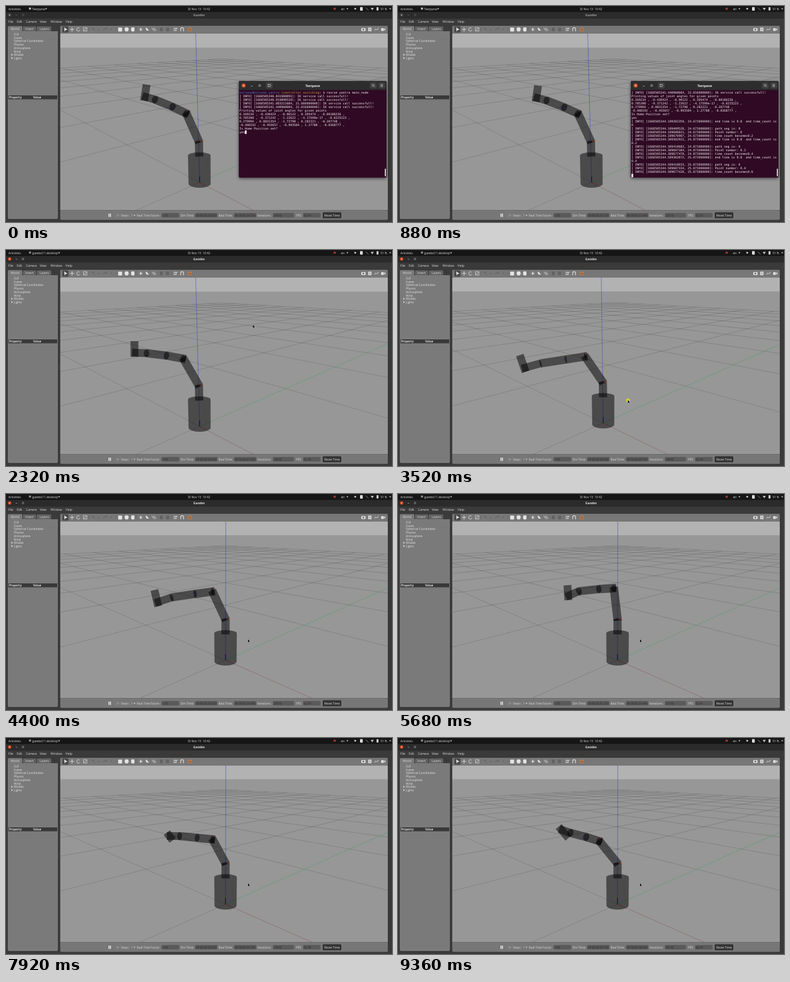
Write an HTML page with a canvas that moves like this. It is 640 by 360 pixels and loops after 9.44 s.

```html
<!DOCTYPE html>
<html lang="en">
<head>
<meta charset="utf-8">
<title>Robot arm simulation</title>
<style>
html, body { margin: 0; width: 100%; height: 100%; overflow: hidden; background: #333; }
canvas { display: block; width: 640px; height: 360px; }
</style>
</head>
<body>
<canvas id="stage"></canvas>
<script>
const canvas = document.getElementById('stage');
const ctx = canvas.getContext('2d');
const ratio = window.devicePixelRatio || 1;
canvas.width = 640 * ratio;
canvas.height = 360 * ratio;

const LOOP = 9440, STEP = 80;
const UI = '"Open Sans", "Noto Sans", sans-serif';
const MONO = '"DejaVu Sans Mono", monospace';
const SHELL_NAME = 'Textpane';
const SHELL_CLOSE = 2000;

// ---- drawing helpers ----
function rect(x, y, w, h, color) {
  ctx.fillStyle = color;
  ctx.fillRect(x, y, w, h);
}
function round(x, y, w, h, r, color) {
  ctx.fillStyle = color;
  ctx.beginPath();
  ctx.roundRect(x, y, w, h, r);
  ctx.fill();
}
function dot(x, y, r, color) {
  ctx.fillStyle = color;
  ctx.beginPath();
  ctx.arc(x, y, r, 0, 7);
  ctx.fill();
}
function poly(points, color) {
  ctx.fillStyle = color;
  ctx.beginPath();
  points.forEach(([x, y]) => ctx.lineTo(x, y));
  ctx.closePath();
  ctx.fill();
}
function stroke(points, color, width = 1) {
  ctx.strokeStyle = color;
  ctx.lineWidth = width;
  ctx.beginPath();
  points.forEach(([x, y]) => ctx.lineTo(x, y));
  ctx.stroke();
}
function text(s, x, y, { size = 5, color = '#ddd', font = UI, weight = '', align = 'left' } = {}) {
  ctx.font = `${weight} ${size}px ${font}`;
  ctx.fillStyle = color;
  ctx.textAlign = align;
  ctx.textBaseline = 'alphabetic';
  ctx.fillText(s, x, y);
}
function caret(x, y, color = '#ccc') {
  poly([[x - 1.7, y - 0.9], [x + 1.7, y - 0.9], [x, y + 1.2]], color);
}

// ---- motion ----
const mix = (a, b, u) => a + (b - a) * u;

// Smooth curve through [time, values] keys, at rest at both ends.
function curve(keys, t) {
  const last = keys.length - 1;
  if (t <= keys[0][0]) return keys[0][1];
  if (t >= keys[last][0]) return keys[last][1];
  const i = keys.findIndex(k => k[0] > t) - 1;
  const slope = (n, c) => n === 0 || n === last ? 0
    : (keys[n + 1][1][c] - keys[n - 1][1][c]) / (keys[n + 1][0] - keys[n - 1][0]);
  const [t0, a] = keys[i], [t1, b] = keys[i + 1];
  const d = t1 - t0, u = (t - t0) / d, u2 = u * u, u3 = u2 * u;
  return a.map((v, c) => (2 * u3 - 3 * u2 + 1) * v + (u3 - 2 * u2 + u) * d * slope(i, c)
    + (3 * u2 - 2 * u3) * b[c] + (u3 - u2) * d * slope(i + 1, c));
}

// elbow, joint, joint, wrist, hand tip (x, y from the base) and joint disc width
const ARM = [
  [515, [-22, -115, -45, -126, -74, -138, -91, -143, -88, -162, 5]],
  [1840, [-26, -113, -50, -120, -81, -127, -99, -130, -97, -148, 4.5]],
  [2320, [-27, -113, -55, -118, -88, -122, -108, -123, -108, -141, 4.5]],
  [3520, [-30, -111, -62, -106, -104, -99.5, -131, -92, -138, -112.5, 1.6]],
  [5680, [-6, -120, -31, -118.5, -64, -115, -82, -107, -83, -124, 4.5]],
  [7040, [6.5, -118.5, -30, -108, -69, -97.5, -92, -82, -106, -98, 1.2]],
  [8360, [-30, -105, -52, -112, -78, -119, -93, -124, -82, -111, 5]]
];
const BASE = [[3080, [321, 294]], [3520, [340.3, 288.5]], [4160, [364, 277]]];
const POINTER = [
  [1120, [520, 214]], [1680, [408, 135]], [2480, [408, 135]], [3080, [363, 256]],
  [3520, [381, 250]], [4160, [401, 242]]
];

// ---- 3D view: fixed orientation, panned camera ----
const CX = 361.5, CY = 193, FOCAL = 470, DEPTH = 1.85, PITCH = 0.2756;
const SIN = Math.sin(PITCH), COS = Math.cos(PITCH), R2 = Math.SQRT1_2;

function toCamera(x, y, z, base) {
  const side = (x + y) * R2, ahead = (y - x) * R2;
  return [
    (base[0] - CX) / FOCAL * DEPTH + side,
    (base[1] - CY) / FOCAL * DEPTH - ahead * SIN - z * COS,
    DEPTH + ahead * COS - z * SIN
  ];
}
const project = p => [CX + FOCAL * p[0] / p[2], CY + FOCAL * p[1] / p[2]];

function line3(a, b, base, color, width) {
  const near = 0.1;
  let p = toCamera(...a, base), q = toCamera(...b, base);
  if (p[2] < near && q[2] < near) return;
  if (p[2] > q[2]) [p, q] = [q, p];
  if (p[2] < near) {
    const u = (near - p[2]) / (q[2] - p[2]);
    p = p.map((v, i) => mix(v, q[i], u));
  }
  stroke([project(p), project(q)], color, width);
}

function drawGround(base) {
  const edge = project(toCamera(-33, 33, 0, base))[1];
  const grid = 'rgba(45,45,45,.4)';
  rect(90, 46, 543, 30, '#b2b2b2');
  rect(90, edge, 543, 341 - edge, '#979797');
  for (let i = -10; i <= 10; i++) {
    line3([i, -10, 0], [i, 10, 0], base, grid, 0.5);
    line3([-10, i, 0], [10, i, 0], base, grid, 0.5);
  }
  line3([0, 0, 0], [10, 0, 0], base, 'rgba(180,85,85,.5)', 0.6);
  line3([0, 0, 0], [0, 10, 0], base, 'rgba(95,195,115,.6)', 0.7);
  line3([0, 0, 0], [0, 0, 5], base, 'rgba(55,55,205,.65)', 0.8);
}

// ---- robot ----
const SHADE = 'rgba(0,0,0,.51)';

function link(a, b, width, before = 0, after = 0) {
  const len = Math.hypot(b[0] - a[0], b[1] - a[1]) || 1;
  const ux = (b[0] - a[0]) / len, uy = (b[1] - a[1]) / len;
  const nx = -uy * width / 2, ny = ux * width / 2;
  const p = [a[0] - ux * before, a[1] - uy * before];
  const q = [b[0] + ux * after, b[1] + uy * after];
  poly([[p[0] + nx, p[1] + ny], [q[0] + nx, q[1] + ny],
    [q[0] - nx, q[1] - ny], [p[0] - nx, p[1] - ny]], SHADE);
}
function disc(p, rx, ry, angle) {
  ctx.fillStyle = SHADE;
  ctx.beginPath();
  ctx.ellipse(p[0], p[1], rx, ry, angle, 0, 7);
  ctx.fill();
}

function drawRobot(t, base) {
  const pose = curve(ARM, t), [bx, by] = base;
  const [elbow, j1, j2, wrist, tip] = [0, 2, 4, 6, 8].map(i => [bx + pose[i], by + pose[i + 1]]);
  const lean = (bx - 364) * 0.026;
  const shoulder = [bx + lean, by - 68];
  const thick = pose[10];

  ctx.fillStyle = SHADE;
  ctx.beginPath();
  ctx.ellipse(bx + lean / 2, by - 45, 18.7, 5, 0, Math.PI, 0);
  ctx.lineTo(bx + 18.3, by + 2);
  ctx.ellipse(bx, by + 2, 18.3, 7, 0, 0, Math.PI);
  ctx.closePath();
  ctx.fill();
  link(shoulder, [bx + lean / 2, by - 43], 13.5);
  disc(shoulder, 6.5, 1.8, -0.1);
  link(shoulder, elbow, 14, 2, 2);

  const reach = Math.atan2(j1[1] - elbow[1], j1[0] - elbow[0]);
  link(elbow, j1, 13.8, 4);
  link(j1, j2, 13.5);
  link(j2, wrist, 13, 0, 4);
  disc(elbow, thick, 6, reach);
  disc(j1, thick, 6.5, reach);
  disc(j2, thick, 6.4, Math.atan2(wrist[1] - j2[1], wrist[0] - j2[0]));
  link(wrist, tip, 13, 7, 1);

  stroke([[bx, by - 10], [bx, by]], '#101050', 1.2);
  stroke([[bx, by], [bx + 7, by + 4]], '#7a2020', 0.8);
  stroke([[bx, by], [bx + 5, by - 2]], '#1d5c2a', 0.7);
  stroke([[shoulder[0] + 2, shoulder[1]], [shoulder[0] + 7, shoulder[1] - 1]], '#b4451c', 0.9);
  stroke([shoulder, [shoulder[0] - 3, shoulder[1] - 3]], '#1c2070', 0.8);
  stroke([[elbow[0], elbow[1] - 6], [elbow[0] + 3, elbow[1] - 4]], '#9c3030', 0.8);
  stroke([[j1[0], j1[1] - 6], [j1[0] + 2, j1[1] - 6.5]], '#8c3030', 0.7);
  stroke([[j1[0] - 4, j1[1]], [j1[0], j1[1] + 1]], '#22267c', 0.7);
}

// ---- window chrome ----
function drawTopBar(t) {
  const shell = t < SHELL_CLOSE;
  rect(0, 0, 640, 10, '#161616');
  text('Activities', 4, 6.5);
  round(38, 2.5, 3.5, 3.5, 0.8, shell ? '#b5b5b5' : '#888');
  text(shell ? SHELL_NAME : 'gazebo11.desktop', 43.5, 6.5);
  caret(shell ? 66.5 : 88, 4.7);
  text('Di Nov 15  10:42', 320, 6.5, { align: 'center', size: 4.9 });
  dot(545, 4.5, 2.1, '#a8302c');
  text('en', 555.5, 6.5);
  caret(566, 4.7);
  dot(579, 4.5, 1.6, '#ccc');
  round(587, 1.7, 4.5, 6, 1, '#ddd');
  stroke([[596.5, 3], [601, 7]], '#aaa', 0.8);
  poly([[604.5, 3.2], [610, 3.2], [607.2, 7]], '#ccc');
  round(614.5, 2, 3, 5.5, 0.5, '#ddd');
  text('91 %', 621, 6.5, { size: 4.8 });
  caret(637, 4.7);
}

function drawWindow(t) {
  const shell = t < SHELL_CLOSE;
  rect(0, 10, 640, 350, '#3a3a3a');
  rect(0, 10, 640, 11, '#2b2b2b');
  dot(6, 15, 2.7, shell ? '#454545' : '#df4a22');
  stroke([[5, 14], [7, 16]], '#ddd', 0.5);
  stroke([[7, 14], [5, 16]], '#ddd', 0.5);
  stroke([[16, 15.5], [18.5, 15.5]], shell ? '#777' : '#ccc', 0.6);
  ctx.strokeStyle = shell ? '#777' : '#ccc';
  ctx.lineWidth = 0.5;
  ctx.strokeRect(27, 13.8, 2.4, 2.4);
  text('Gazebo', 320, 17, { size: 5.2, weight: 'bold', align: 'center', color: shell ? '#999' : '#ddd' });
  [['File', 4], ['Edit', 18], ['Camera', 33], ['View', 56], ['Window', 74], ['Help', 99]]
    .forEach(([s, x]) => text(s, x, 27.6));
}

function drawSidebar() {
  round(3, 33.5, 24, 9, 1.5, '#7a7a7a');
  round(28, 34, 22, 8, 1.5, '#626262');
  round(51, 34, 24, 8, 1.5, '#626262');
  text('World', 8, 39.8);
  text('Insert', 32, 39.8);
  text('Layers', 56, 39.8);
  round(3, 42, 83, 313, [0, 0, 2, 2], '#7a7a7a');
  ['GUI', 'Scene', 'Spherical Coordinates', 'Physics', 'Atmosphere', 'Wind', 'Models', 'Lights']
    .forEach((s, i) => text(s, 13, 49 + i * 5.7, { size: 4.8, color: '#e2e2e2' }));
  [81.2, 86.8].forEach(y => poly([[9, y - 1.8], [11, y], [9, y + 1.8]], '#f4f4f4'));
  rect(4, 149, 81, 6.5, '#393939');
  text('Property', 5, 154.2, { weight: 'bold', size: 4.8 });
  text('Value', 45, 154.2, { weight: 'bold', size: 4.8 });
  [192, 195, 198].forEach(y => dot(88.3, y, 0.5, '#777'));
}

function drawToolbar() {
  const ink = '#dedede', dim = '#636363', y = 39;
  const divider = x => stroke([[x, 35], [x, 43]], '#666', 0.6);
  round(90, 33, 543, 13, 1.5, '#777');
  round(93.5, 33.8, 10, 10.5, 1, '#484848');
  poly([[96.5, 35.5], [102, 39.5], [99.2, 40], [97, 42.5]], ink);
  stroke([[106, y], [113, y]], ink, 0.9);
  stroke([[109.5, 35.5], [109.5, 42.5]], ink, 0.9);
  ctx.strokeStyle = ink;
  ctx.beginPath();
  ctx.arc(120, y, 2.8, 0.4, 5.6);
  ctx.stroke();
  ctx.lineWidth = 0.7;
  ctx.strokeRect(128.3, 36, 5.8, 5.8);
  stroke([[129, 41.5], [133.8, 36.5]], ink, 0.8);
  [136.8, 182, 217, 251, 275].forEach(divider);
  stroke([[147, 41], [146, 38], [142, 38], [144, 36]], dim, 1);
  caret(153, y, dim);
  stroke([[162, 41], [163, 38], [168, 38], [166, 36]], dim, 1);
  caret(174.5, y, dim);
  round(186, 36, 6.5, 6.5, 1, '#e3e3e3');
  dot(200, y, 3.4, '#e3e3e3');
  round(207.5, 35.6, 5.5, 7, 2, '#e3e3e3');
  dot(223.5, y, 1.7, ink);
  for (let a = 0; a < 8; a++) {
    const c = Math.cos(a * Math.PI / 4), s = Math.sin(a * Math.PI / 4);
    stroke([[223.5 + 2.2 * c, y + 2.2 * s], [223.5 + 3.3 * c, y + 3.3 * s]], ink, 0.6);
  }
  poly([[231, 36], [234, 37], [237, 41], [233, 41]], ink);
  [0, 2, 4].forEach(d => stroke([[242 + d, 36.5], [245 + d, 41.5]], ink, 0.7));
  round(255, 36, 5, 6, 0.5, dim);
  round(265.5, 36, 5, 6, 0.5, dim);
  stroke([[278.7, 36], [278.7, 42]], ink, 0.8);
  rect(280, 36.7, 4, 1.5, ink);
  rect(280, 39.8, 3, 1.5, ink);
  ctx.strokeStyle = ink;
  ctx.lineWidth = 1.2;
  ctx.beginPath();
  ctx.arc(292, 38.6, 2.4, Math.PI, 0);
  ctx.stroke();
  stroke([[289.6, 38.5], [289.6, 42]], ink, 1.2);
  stroke([[294.4, 38.5], [294.4, 42]], ink, 1.2);
  round(301.8, 36.3, 5.6, 5.8, 1, '#c67a45');
  rect(303.5, 38.3, 2.5, 2, '#80482a');
  round(589, 36.7, 7.2, 5, 1, ink);
  dot(592.5, 39.2, 1.4, '#666');
  round(600.5, 36, 5.5, 6, 0.7, ink);
  stroke([[602, 38], [605, 38]], '#555', 0.6);
  stroke([[602, 40], [605, 40]], '#555', 0.6);
  stroke([[611, 41], [613.2, 38], [615.2, 40], [618, 36.5]], ink, 0.9);
  round(622, 37, 4.5, 4.5, 0.6, ink);
  poly([[626.5, 39], [629, 37], [629, 41.3]], ink);
}

function drawStatus(t) {
  const sim = 24.03 + t * 0.00125;
  const clock = s => '00 00:00:' + s.toFixed(3);
  const label = { size: 4.8, color: '#d8d8d8' };
  round(90, 341, 543, 15.5, [0, 0, 2, 2], '#777');
  rect(170, 346, 1.4, 5.5, '#f2f2f2');
  rect(172.6, 346, 1.4, 5.5, '#f2f2f2');
  stroke([[183, 346.5], [183, 351.5]], '#999', 0.8);
  poly([[185, 346.5], [188, 349], [185, 351.5]], '#999');
  text('Steps:', 190.5, 350.5, label);
  text('1', 207.5, 350.5, label);
  caret(213, 349, '#ccc');
  [
    ['Real Time Factor:', 217, 258, 29, '1.00'],
    ['Sim Time:', 289.5, 313.5, 37, clock(sim)],
    ['Real Time:', 352.5, 378, 37, clock(sim + 0.364)],
    ['Iterations:', 417, 442.5, 35, String(Math.round(sim * 1000))],
    ['FPS:', 481, 492.5, 29, (62.4 + 0.3 * Math.sin(t / 900)).toFixed(2)]
  ].forEach(([name, x, fx, w, value]) => {
    text(name, x, 350.5, label);
    round(fx, 345, w, 7.5, 1, '#5a5a5a');
    text(value, fx + 1.5, 350.5, { size: 4.6, color: '#2a2a2a' });
  });
  round(525, 343.7, 31, 10, 1.5, '#333');
  text('Reset Time', 540.5, 350.6, { align: 'center' });
}

// ---- shell window ----
const INTRO = [
  '',
  '[ INFO] [1668505340.841900891]: IK service call successfull!',
  '[ INFO] [1668505340.919890510]: IK service call successfull!',
  '[ INFO] [1668505341.083211084, 21.660000000]: IK service call successfull!',
  '[ INFO] [1668505341.440960004, 22.016000000]: IK service call successfull!',
  'Printing values of joint angles for given points',
  '0.169234 , -0.430424 , -0.90122 , 0.305474 , -0.00180236 ,',
  '0.785398 , -0.371242 , -1.22622 , -4.17599e-17 , -0.0225223 ,',
  '0.279994 , 0.0831354 , -1.72798 , 0.282221 , -0.207748 ,',
  '-0.408192 , -0.455657 , -0.993584 , 1.27788 , -0.0368777 ,',
  'Is Home Position set?',
  'yes'
];

function logGroup(k) {
  const value = n => String(+(n * 0.2).toFixed(1));
  const simStamp = (24.673 + k * 0.2).toFixed(3) + '000000';
  const jitter = k * 7919 % 613;
  const head = us => `[ INFO] [${(1668505344 + 0.109 + k * 0.2).toFixed(3)}${302359 + us + jitter}, ${simStamp}]: `;
  return [
    head(0) + 'end time is 9.8  and time_count is',
    value(k),
    head(107161) + 'path_seg is: 0',
    head(304462) + 'Point number: ' + value(k),
    head(374548) + 'time_count becomes' + value(k + 1)
  ];
}

function drawShell(t) {
  const x = 386, y = 125;
  ctx.save();
  ctx.shadowColor = 'rgba(0,0,0,.6)';
  ctx.shadowBlur = 5 * ratio;
  ctx.shadowOffsetY = 1.5 * ratio;
  round(x, y, 245, 161, 2, '#300a24');
  ctx.restore();
  round(x, y, 245, 15, [2.5, 2.5, 0, 0], '#2d2d2d');
  dot(394, 132.5, 3.2, '#e2532b');
  stroke([[392.9, 131.4], [395.1, 133.6]], '#fff', 0.6);
  stroke([[395.1, 131.4], [392.9, 133.6]], '#fff', 0.6);
  if (t >= 1640) dot(407.5, 132.5, 3.2, '#484848');
  stroke([[406, 133.5], [409, 133.5]], '#ccc', 0.7);
  ctx.strokeStyle = '#ccc';
  ctx.lineWidth = 0.6;
  ctx.strokeRect(419.2, 131.2, 2.8, 2.8);
  round(431, 127.5, 11, 10, 1.5, '#414141');
  ctx.strokeRect(434.5, 130.5, 4, 4);
  stroke([[436.5, 131.5], [436.5, 133.7]], '#ddd', 0.6);
  text(SHELL_NAME, 508.5, 134.5, { size: 5.3, weight: 'bold', align: 'center', color: '#eee' });
  round(603.5, 127.5, 11, 10, 1.5, '#414141');
  ctx.beginPath();
  ctx.arc(608.6, 132, 1.6, 0, 7);
  ctx.stroke();
  stroke([[609.7, 133.2], [611, 134.6]], '#ddd', 0.7);
  round(617.5, 127.5, 11, 10, 1.5, '#414141');
  [130.8, 132.5, 134.2].forEach(v => stroke([[621, v], [625, v]], '#ddd', 0.6));

  const lines = INTRO.slice();
  for (let k = 0; 24.673 + k * 0.2 <= 24.03 + t * 0.00125; k++) lines.push(...logGroup(k));
  const first = Math.max(0, lines.length - 23);
  const mono = { font: MONO, color: '#f0ecef' };
  lines.slice(first).forEach((s, i) => {
    const row = 145.8 + i * 6.02;
    if (first + i > 0) return text(s, 387, row, mono);
    let px = 387;
    [['kolvane@kolvane', '#4a76c4'], [' yantra', '#4a76c4'], [' (controller_switching)', '#c0a038'],
      [' $ rosrun yantra main_node', '#f0ecef']].forEach(([part, color]) => {
      text(part, px, row, { font: MONO, color });
      px += ctx.measureText(part).width;
    });
  });
  const waiting = lines.length === INTRO.length;
  const row = waiting ? lines.length - 1 : Math.min(lines.length, 23);
  rect(waiting ? 396 : 387, 141.2 + row * 6.02, 3, 5.8, '#f4f0f3');
  round(628, 271, 2, 13, 1, '#d2ccd0');
}

function drawPointer(t) {
  if (t < 1120) return;
  const [x, y] = curve(POINTER, t);
  if (t >= 3080 && t < 4160) dot(x + 0.6, y + 0.6, 3.3, 'rgba(220,212,40,.85)');
  const tip = [[x, y], [x, y + 5], [x + 1.2, y + 4], [x + 2.2, y + 5.8], [x + 2.9, y + 5.4],
    [x + 2.1, y + 3.7], [x + 3.5, y + 3.5]];
  stroke([...tip, tip[0]], '#e8e8e8', 0.6);
  poly(tip, '#111');
}

function draw(t) {
  ctx.setTransform(ratio, 0, 0, ratio, 0, 0);
  const base = curve(BASE, t);
  drawWindow(t);
  drawSidebar();
  drawToolbar();
  ctx.save();
  ctx.beginPath();
  ctx.rect(90, 46, 543, 294.5);
  ctx.clip();
  drawGround(base);
  drawRobot(t, base);
  ctx.restore();
  drawStatus(t);
  drawTopBar(t);
  if (t < SHELL_CLOSE) drawShell(t);
  drawPointer(t);
}

const start = performance.now();
function tick() {
  const t = Math.max(0, performance.now() - start) % LOOP;
  draw(Math.floor(t / STEP) * STEP);
  requestAnimationFrame(tick);
}
tick();
</script>
</body>
</html>
```
